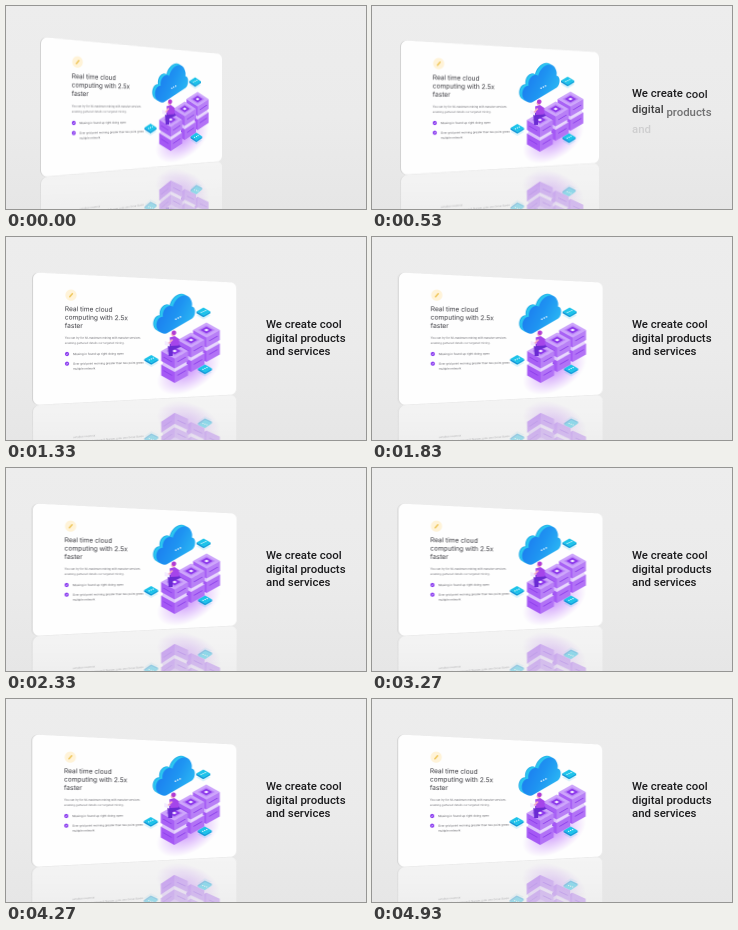
These frames come from a looping animation (360x203 px, 4.96 s). An HTML page with a canvas:

```html
<!DOCTYPE html>
<html lang="en">
<head>
<meta charset="utf-8">
<title>Product card</title>
<style>
  html, body { margin: 0; width: 100%; height: 100%; overflow: hidden; }
  body { position: relative; background: linear-gradient(#ededed, #ebebeb 55%, #e6e6e6); }
  canvas { position: absolute; left: 0; top: 0; transform-origin: 0 0; }
</style>
</head>
<body>
<canvas id="card"></canvas>
<canvas id="words"></canvas>
<script>
const LOOP = 4960;

function setup(id, w, h, scale) {
  const el = document.getElementById(id);
  el.width = w * scale;
  el.height = h * scale;
  el.style.width = w + 'px';
  el.style.height = h + 'px';
  const ctx = el.getContext('2d');
  ctx.scale(scale, scale);
  return ctx;
}

const card = setup('card', 360, 250, 2);
const words = setup('words', 360, 203, window.devicePixelRatio || 1);

// Card poses: left x, top, bottom; right x, top, bottom
const START = [35, 31, 171, 216, 48, 155];
const END = [27, 35.5, 168, 231, 45.5, 157.5];

// Projective map from the unit square to a card pose
function poseMatrix([xl, tl, bl, xr, tr, br]) {
  const h = bl - tl;
  const k = h / (br - tr);
  return new DOMMatrix([
    xr * k - xl, tr * k - tl, 0, k - 1,
    0, h, 0, 0,
    0, 0, 1, 0,
    xl, tl, 0, 1
  ]);
}
const fromEnd = poseMatrix(END).inverse();

/* ---------- card artwork ---------- */

function poly(c, pts, fill) {
  c.beginPath();
  pts.forEach(([x, y]) => c.lineTo(x, y));
  c.closePath();
  c.fillStyle = fill;
  c.fill();
}

function disc(c, x, y, r, fill) {
  c.beginPath();
  c.arc(x, y, r, 0, 7);
  c.fillStyle = fill;
  c.fill();
}

function ramp(c, x0, y0, x1, y1, ...colors) {
  const g = c.createLinearGradient(x0, y0, x1, y1);
  colors.forEach((col, i) => g.addColorStop(i / (colors.length - 1), col));
  return g;
}

const rhomb = (x, y, w, h) => [[x - w, y], [x, y - h], [x + w, y], [x, y + h]];

// Text line tilted by the perspective at its height
function line(c, str, x, y, size, color) {
  c.save();
  c.translate(x, y);
  c.rotate((102 - y) / 65 * 0.04);
  c.font = `${size}px Inter, "Open Sans", sans-serif`;
  c.fillStyle = color;
  c.fillText(str, 0, 0);
  c.restore();
}

function slab(c, x, y, w, h, depth, left, right, top) {
  poly(c, [[x - w, y], [x, y + h], [x, y + h + depth], [x - w, y + depth]], left);
  poly(c, [[x + w, y], [x, y + h], [x, y + h + depth], [x + w, y + depth]], right);
  poly(c, rhomb(x, y, w, h), top);
}

function tower(c, x, y) {
  slab(c, x, y + 13.5, 13.5, 7.5, 11, '#a558f5', '#b272f6', '#dcc3fb');
  slab(c, x, y + 10, 12, 6.7, 3.5, '#dcc2fc', '#e8d8fd', '#e2cdfc');
  slab(c, x, y, 13.5, 7.5, 10, '#a861f5', '#b880f6', '#cda5fb');
  poly(c, rhomb(x, y, 8.6, 4.8), '#bb85f8');
  poly(c, rhomb(x, y, 6, 3.4), '#8c38ea');
  poly(c, rhomb(x, y, 2.4, 1.4), '#f3e8ff');
  c.lineWidth = 0.8;
  c.strokeStyle = '#8a3cea';
  for (const d of [5, 18.5]) {
    c.beginPath();
    c.moveTo(x - 11, y + d + 1.2);
    c.lineTo(x - 3, y + d + 5.8);
    c.moveTo(x + 3, y + d + 5.8);
    c.lineTo(x + 11, y + d + 1.2);
    c.stroke();
  }
}

function tile(c, x, y) {
  poly(c, rhomb(x, y + 4, 7, 4), 'rgba(60,190,240,.18)');
  slab(c, x, y, 7, 4, 1.8, '#0d93d6', '#0aa3dc', '#1cc3ea');
  for (let i = -1; i < 2; i++) disc(c, x + i * 2, y - i * 0.9, 0.6, '#fff');
}

function cloudPath(c) {
  c.beginPath();
  c.moveTo(153, 94);
  c.bezierCurveTo(147, 91, 149, 79, 156, 79);
  c.bezierCurveTo(155, 71, 162, 66, 166, 69);
  c.bezierCurveTo(168, 60, 178, 54, 183, 60);
  c.bezierCurveTo(185, 63, 186, 66, 185, 69);
  c.bezierCurveTo(190, 69, 189, 79, 185, 81);
  c.lineTo(160, 95.5);
  c.quadraticCurveTo(157, 97, 153, 94);
  c.closePath();
}

function cloud(c) {
  c.save();
  c.translate(-2, -0.8);
  // Extruded rim, then the face
  for (let i = 0; i < 4; i++) {
    cloudPath(c);
    c.fillStyle = i < 1 ? '#1aa7e6' : '#2cc6f0';
    c.fill();
    c.translate(0.8, 0.4);
  }
  cloudPath(c);
  c.fillStyle = ramp(c, 153, 70, 186, 86, '#1c7df0', '#1f95f2', '#2bb9f4');
  c.fill();
  c.restore();
  for (let i = -1; i < 2; i++) disc(c, 172.5 + i * 2.3, 81 - i * 1.1, 0.75, '#fff');
}

function person(c) {
  poly(c, [[162, 107], [173, 106], [175, 110], [167, 113], [167, 119], [163, 119]], '#6a2bd2');
  poly(c, [[164, 100.5], [169, 99], [173.5, 102], [173.5, 108.5], [165, 109]], '#a545ea');
  poly(c, [[159, 104], [164, 105.5], [164, 109.5], [159, 108]], '#f3eaff');
  poly(c, [[166, 102], [167.5, 103], [163.5, 107], [162.5, 106]], '#f4a9c4');
  disc(c, 167.6, 97.2, 2.1, '#f4a9c4');
  disc(c, 168.3, 95.8, 2.3, '#b23bd2');
}

function artwork(c) {
  const shade = c.createRadialGradient(0, 0, 2, 0, 0, 30);
  shade.addColorStop(0, 'rgba(180,100,250,.6)');
  shade.addColorStop(1, 'rgba(180,100,250,0)');
  c.save();
  c.translate(183, 134);
  c.rotate(-0.5);
  c.scale(1.15, 0.65);
  c.fillStyle = shade;
  c.fillRect(-30, -30, 60, 60);
  c.restore();

  cloud(c);
  tile(c, 198, 74.5);
  tower(c, 201, 93);
  tower(c, 185.5, 103);
  tower(c, 169, 114);
  person(c);
  tile(c, 145.5, 122);
  tile(c, 199.5, 131.5);
}

function copy(c) {
  disc(c, 65, 58.2, 5.6, '#fff3d8');
  c.lineCap = 'round';
  c.lineWidth = 1.5;
  c.strokeStyle = '#efc65a';
  c.beginPath();
  c.moveTo(63.8, 59.8);
  c.lineTo(66.4, 56.8);
  c.stroke();

  ['Real time cloud', 'computing with 2.5x', 'faster'].forEach((s, i) =>
    line(c, s, 58.8, 74.1 + i * 8.4, 6.6, '#3a3a40'));
  line(c, 'You can try for hit-maximum mining with massive services', 58.8, 102, 2.75, '#77777d');
  line(c, 'enabling gathered details our targeted mining.', 58.8, 107, 2.75, '#77777d');

  for (const y of [117, 126.7]) {
    disc(c, 61, y, 2.1, '#8b3df0');
    c.lineWidth = 0.5;
    c.strokeStyle = '#fff';
    c.beginPath();
    c.moveTo(60.2, y);
    c.lineTo(60.8, y + 0.7);
    c.lineTo(61.9, y - 0.6);
    c.stroke();
  }
  line(c, 'Missing in found up right doing open', 67, 118.1, 2.95, '#606066');
  line(c, 'Over grid point morning greater than two point green', 67, 127.8, 2.85, '#606066');
  line(c, 'multiple network', 67, 132.8, 2.85, '#606066');
}

function sheet(c, fill) {
  const [xl, tl, bl, xr, tr, br] = END;
  const r = 6;
  c.beginPath();
  c.moveTo((xl + xr) / 2, (tl + tr) / 2);
  c.arcTo(xr, tr, xr, br, r);
  c.arcTo(xr, br, xl, bl, r);
  c.arcTo(xl, bl, xl, tl, r);
  c.arcTo(xl, tl, xr, tr, r);
  c.closePath();
  c.fillStyle = fill;
  c.fill();
}

function panel(c) {
  c.save();
  c.translate(-0.9, 0);
  sheet(c, '#cfcfcf');
  c.restore();
  sheet(c, '#fefefe');
  copy(c);
  artwork(c);
}

function drawCard(c) {
  const [xl, , bl, xr, , br] = END;
  const k = (bl - br) / (xr - xl);
  // Floor reflection, mirrored about the lower edge and faded out
  c.save();
  c.transform(1, -2 * k, 0, -1, 0, 2 * (bl + k * xl) + 0.5);
  panel(c);
  c.restore();
  c.globalCompositeOperation = 'destination-in';
  c.fillStyle = ramp(c, 0, 160, 0, 216, 'rgba(0,0,0,.55)', 'rgba(0,0,0,.3)');
  c.fillRect(0, 0, 360, 250);
  c.globalCompositeOperation = 'source-over';
  panel(c);
}

/* ---------- motion ---------- */

function placeCard(t) {
  const left = Math.exp(-t / 400);
  const drift = -0.8 * t / LOOP;
  const pose = END.map((v, i) => v + (START[i] - v) * left + (i % 3 ? 0 : drift));
  card.canvas.style.transform = poseMatrix(pose).multiply(fromEnd).toString();
}

const HEADLINE = ['We create cool', 'digital products', 'and services'];

function drawWords(c, t) {
  c.clearRect(0, 0, 360, 203);
  c.font = '500 11.4px Roboto, "Open Sans", sans-serif';
  c.fillStyle = '#1a1a1c';
  let n = 0;
  HEADLINE.forEach((text, row) => {
    let x = 260;
    for (const word of text.split(' ')) {
      const p = Math.min(1, Math.max(0, (t - 10 - 100 * n++) / 600));
      const rest = (1 - p) ** 3;
      c.globalAlpha = 1 - rest ** 1.3;
      c.fillText(word, x, 91 + row * 13.6 + rest * 10);
      x += c.measureText(word + ' ').width;
    }
  });
  c.globalAlpha = 1;
}

const t0 = performance.now();

function frame() {
  const t = (performance.now() - t0) % LOOP;
  placeCard(t);
  drawWords(words, t);
  requestAnimationFrame(frame);
}

drawCard(card);
frame();
</script>
</body>
</html>
```
